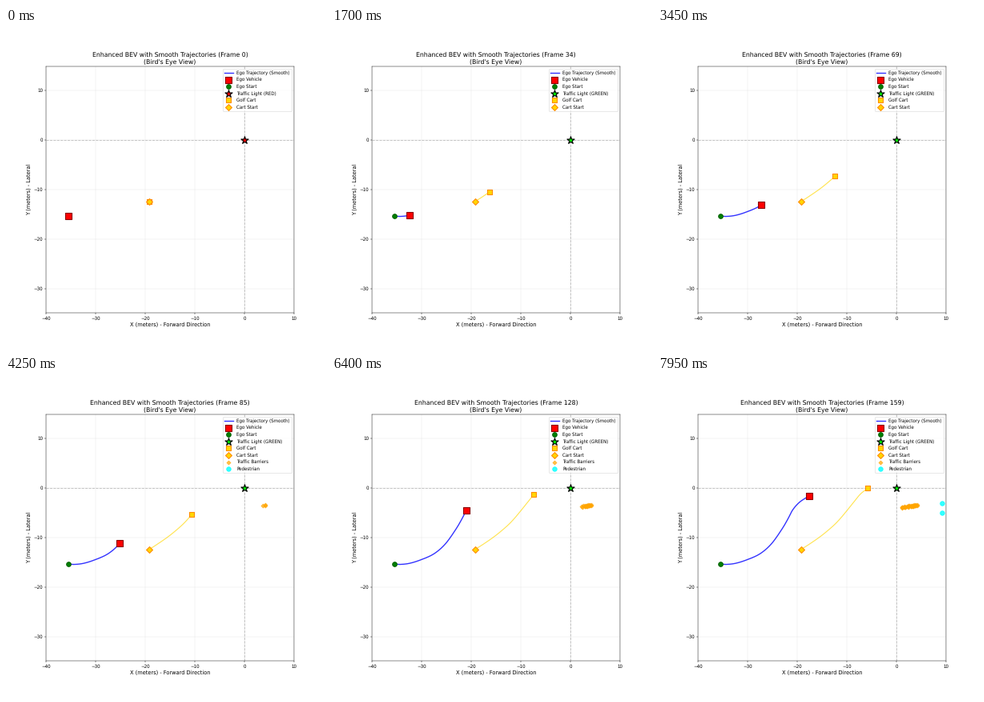
These frames come from a looping animation (400 px wide and 400 px high, 8000 ms). A matplotlib script:

```python
import numpy as np
import matplotlib.pyplot as plt
from matplotlib.animation import FuncAnimation

plt.rcParams["font.family"] = "DejaVu Sans"
plt.rcParams["text.hinting"] = "none"

FRAMES, INTERVAL = 160, 50
GREEN_AT = 26       # light switches
DETECT_AT = 80      # barriers and pedestrians join the scene


def smooth_path(keys):
    """Cubic Hermite curve through (time, x, y) keys, one row per frame."""
    t, p = np.array(keys)[:, 0], np.array(keys)[:, 1:]
    m = np.gradient(p, t, axis=0)
    f = np.arange(FRAMES)
    i = np.clip(np.searchsorted(t, f, side="right") - 1, 0, len(t) - 2)
    h = (t[i + 1] - t[i])[:, None]
    u = ((f - t[i])[:, None]) / h
    return ((2 * u**3 - 3 * u**2 + 1) * p[i] + (u**3 - 2 * u**2 + u) * h * m[i]
            + (3 * u**2 - 2 * u**3) * p[i + 1] + (u**3 - u**2) * h * m[i + 1])


ego = smooth_path([
    (0, -35.55, -15.30), (18, -34.20, -15.40), (34, -32.40, -15.18),
    (49, -30.37, -14.56), (69, -27.30, -13.13), (85, -25.15, -11.20),
    (101, -23.03, -8.22), (115, -21.85, -6.20), (128, -20.95, -4.48),
    (143, -19.55, -2.88), (159, -17.60, -1.60)])
cart = smooth_path([
    (0, -19.26, -12.42), (18, -17.98, -11.61), (49, -14.63, -9.24),
    (69, -12.35, -7.26), (101, -9.15, -3.55), (128, -7.40, -1.37),
    (159, -5.78, -0.07)])

# Barrier detections pile up while drifting left
rng = np.random.default_rng(4)
seen = np.arange(DETECT_AT, FRAMES, 2.5)
left = np.interp(seen, [DETECT_AT, 101, 128, 159], [3.2, 2.9, 2.0, 0.6])
spread = np.interp(seen, [DETECT_AT, 110, 120], [1.0, 1.2, 0.7])
bx = left + spread * rng.random(len(seen))
by = -3.42 - 0.17 * (4.2 - bx) + rng.uniform(-0.14, 0.14, len(seen))
barrier_pts = np.column_stack([bx, by])

fig, ax = plt.subplots(figsize=(10, 10), dpi=40)
ax.set_xlim(-40, 10)
ax.set_ylim(-10 - 24.84, -10 + 24.84)
ax.set_xticks(range(-40, 11, 10))
ax.set_yticks(range(-30, 11, 10))
ax.set_xlabel("X (meters) - Forward Direction", fontsize=12)
ax.set_ylabel("Y (meters) - Lateral", fontsize=12)
ax.grid(True, alpha=0.3)
ax.axhline(0, color="gray", ls="--", alpha=0.5)
ax.axvline(0, color="gray", ls="--", alpha=0.5)
title = ax.set_title("", fontsize=14)


def dot(pos, marker, size, color, label, z, edge="face", lw=1.5, alpha=1):
    return ax.scatter(*pos, s=size, c=color, marker=marker, edgecolors=edge,
                      linewidths=lw, alpha=alpha, label=label, zorder=z)


ego_line, = ax.plot([], [], color="blue", lw=2.5, alpha=0.8,
                    label="Ego Trajectory (Smooth)", zorder=3)
cart_line, = ax.plot([], [], color="gold", lw=2, alpha=0.7, zorder=3)
ego_start = dot(ego[0], "o", 100, "green", "Ego Start", 5, "darkgreen", 2)
ego_box = dot(ego[0], "s", 200, "red", "Ego Vehicle", 10, "darkred", 2)
light = dot((0, 0), "*", 300, "red", "", 9, "black", 2)
cart_box = dot(cart[0], "s", 150, "gold", "Golf Cart", 8, "darkorange", 2)
cart_start = dot(cart[0], "D", 100, "gold", "Cart Start", 9, "darkorange", 2)
barriers = dot((0, 0), "D", 40, "orange", "Traffic Barriers", 6, alpha=0.7)
walkers = dot((20, 0), "o", 100, "cyan", "Pedestrian", 7, alpha=0.8)

handles = [ego_line, ego_box, ego_start, light, cart_box, cart_start,
           barriers, walkers]


def update(n):
    title.set_text(f"Enhanced BEV with Smooth Trajectories (Frame {n})\n"
                   "(Bird's Eye View)")
    ego_line.set_data(*ego[:n + 1].T)
    cart_line.set_data(*cart[:n + 1].T)
    ego_box.set_offsets(ego[n])
    cart_box.set_offsets(cart[n])

    green = n >= GREEN_AT
    light.set_facecolor("lime" if green else "red")
    light.set_label(f"Traffic Light ({'GREEN' if green else 'RED'})")

    found = n >= DETECT_AT
    barriers.set_visible(found)
    walkers.set_visible(found)
    barriers.set_offsets(barrier_pts[seen <= n] if found else [(20, 0)])
    wx = 9.2 + 0.09 * (FRAMES - 1 - n)
    walkers.set_offsets([(wx, -3.12), (wx - 0.05, -4.92)])

    ax.legend(handles=handles if found else handles[:6], loc="upper right",
              fontsize=10)
    return []


anim = FuncAnimation(fig, update, frames=FRAMES, interval=INTERVAL,
                     init_func=lambda: update(0), repeat=True,
                     repeat_delay=0, blit=False)
plt.show()
```
